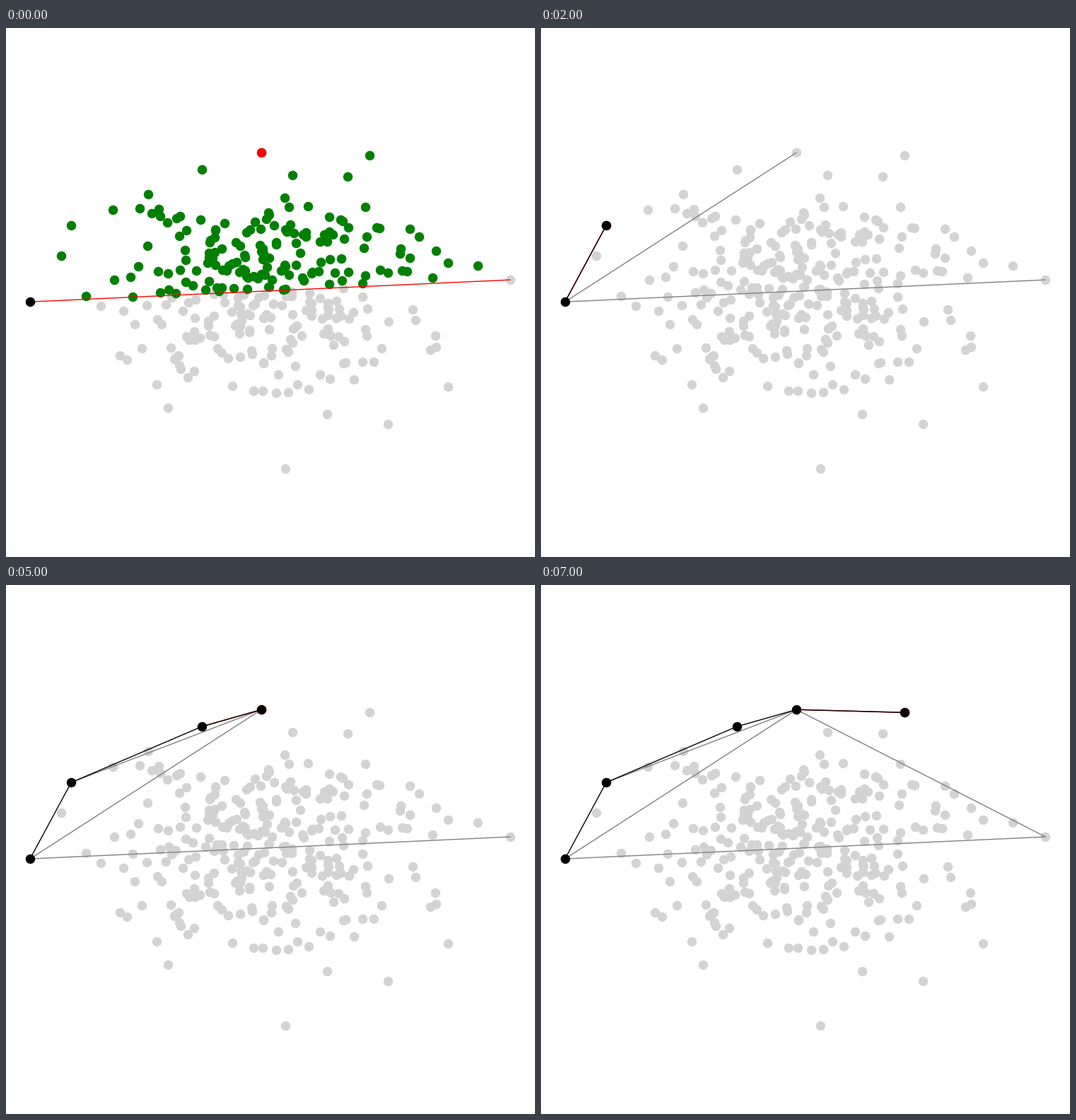
Write a matplotlib script that moves like this. It is 748 by 748 pixels and loops after 8000 ms.

```python
import matplotlib.pyplot as plt
import numpy as np
from matplotlib.animation import FuncAnimation
from matplotlib.collections import LineCollection

SIZE, DPI = 748, 100
STEPS, STEP_MS = 8, 1000
TOTAL = 300

# The corners of the hull and the points that stand clear of the cloud.
START, END, TOP = (34, 387.2), (713.4, 356.1), (361.2, 176.2)
OUTLIERS = [
    (92.2, 279.2), (277.2, 200.1), (513.8, 180.3),
    (78.5, 321.8), (150.8, 257.2), (189.5, 255.2), (201, 235.4),
    (206, 261.8), (216, 255.6), (218.4, 265.8),
    (404.6, 208.4), (482.6, 210), (508, 252.6), (571, 283.5), (667.4, 335.7),
    (229, 537.2), (395.2, 622.9), (454.2, 546), (539.8, 559.7), (625.3, 507),
]


def height(a, b, pts):
    """Signed distance above the line a-b, in screen coordinates."""
    d = np.subtract(b, a)
    return (d[1] * (pts[:, 0] - a[0]) - d[0] * (pts[:, 1] - a[1])) / np.hypot(*d)


def cloud_points(count):
    """Normal cloud, cut to an ellipse below the two lines through TOP."""
    rng = np.random.default_rng(5)
    xy = rng.normal((370, 372), (118, 76), (4 * count, 2))
    inside = (((xy - (372, 385)) / (275, 148)) ** 2).sum(axis=1) < 1
    below = (height(START, TOP, xy) < 0) & (height(TOP, END, xy) < 0)
    return xy[inside & below][:count]


def quickhull(a, b, pts):
    """Yield (a, b, points above, farthest point); no farthest on a hull edge."""
    h = height(a, b, pts)
    above, far = pts[h > 1e-6], None
    if len(above):
        far = pts[h.argmax()]
    yield a, b, above, far
    if far is not None:
        yield from quickhull(a, far, above)
        yield from quickhull(far, b, above)


rim = [START, END, TOP, *OUTLIERS]
points = np.vstack([rim, cloud_points(TOTAL - len(rim))])
start, end = points[:2]
steps = [s for s, _ in zip(quickhull(start, end, points[2:]), range(STEPS))]

fig = plt.figure(figsize=(SIZE / DPI, SIZE / DPI), dpi=DPI, facecolor="white")
ax = fig.add_axes([0, 0, 1, 1])
ax.set(xlim=(0, SIZE), ylim=(SIZE, 0))
ax.axis("off")


def dots(color, z):
    return ax.scatter([], [], s=93, c=color, linewidths=0, zorder=z)


def lines(color, z):
    return ax.add_collection(
        LineCollection([], colors=color, linewidths=1, zorder=z), autolim=False)


cloud = dots("lightgray", 1)
cloud.set_offsets(points)
candidates = dots("green", 2)
splits = lines("gray", 3)
current = lines("red", 4)
edges = lines("black", 5)
farthest = dots("red", 6)
hull = dots("black", 7)


def update(i):
    a, b, above, far = steps[i]
    is_edge = far is None
    done = steps[:i + 1] if is_edge else steps[:i]
    hull_edges = [(p, q) for p, q, _, f in done if f is None]

    candidates.set_offsets(above)
    splits.set_segments([(p, q) for p, q, _, f in done if f is not None])
    current.set_segments([(a, b)])
    edges.set_segments(hull_edges)
    # A newly confirmed corner keeps a red rim under its black dot.
    farthest.set_offsets([b if is_edge else far])
    hull.set_offsets([start] + [q for _, q in hull_edges])
    return candidates, splits, current, edges, farthest, hull


anim = FuncAnimation(fig, update, frames=STEPS, interval=STEP_MS, repeat=True)
plt.show()
```
